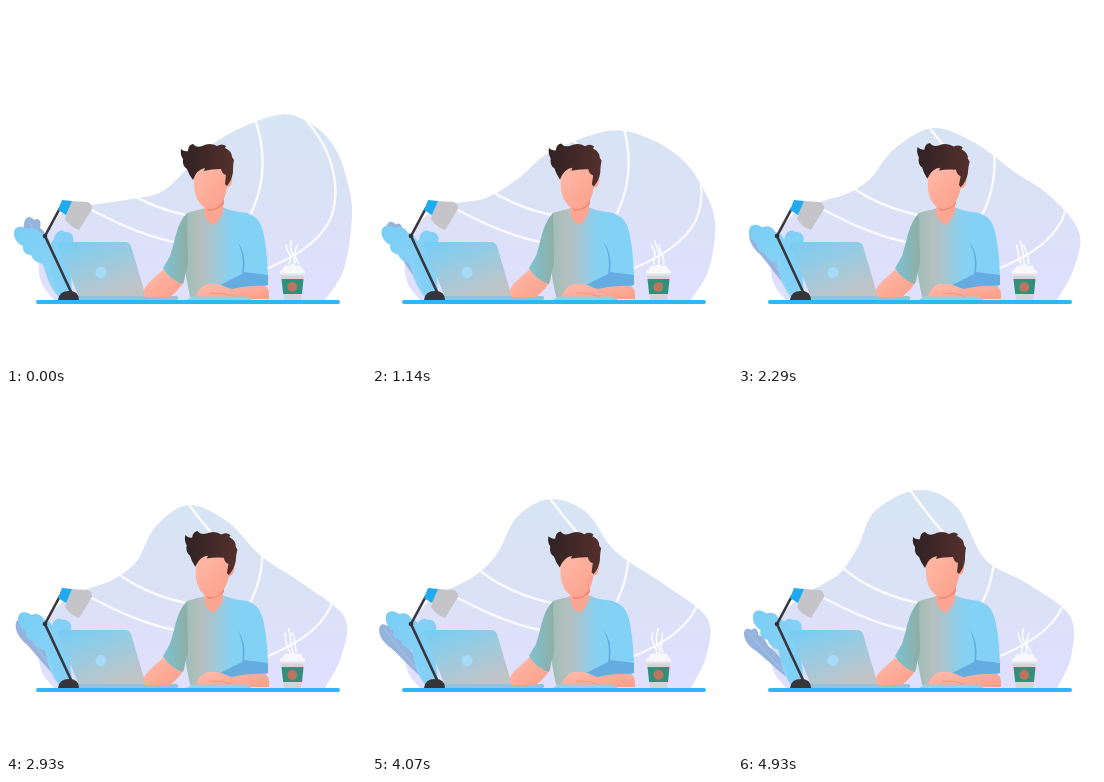
Recreate the animation shown at these times as an HTML page. Size 360 px wide and 360 px high, loop 5000 ms.

```html
<!DOCTYPE html>
<html lang="en">
<head>
<meta charset="utf-8">
<title>Working at a desk</title>
<style>
html, body { margin: 0; width: 100%; height: 100%; overflow: hidden; background: #fff; }
svg { display: block; width: 100vw; height: 100vh; }
</style>
</head>
<body>
<svg viewBox="0 0 360 360">
  <defs>
    <linearGradient id="sky" x1="0" y1="100" x2="0" y2="294" gradientUnits="userSpaceOnUse">
      <stop offset="0" stop-color="#d7e5f3"/><stop offset=".45" stop-color="#dae2f5"/><stop offset="1" stop-color="#e0dfff"/>
    </linearGradient>
    <linearGradient id="screen" x1="0" y1="0" x2=".6" y2="1">
      <stop offset="0" stop-color="#74cdf5"/><stop offset=".5" stop-color="#9bcbe0"/><stop offset="1" stop-color="#c0c4c7"/>
    </linearGradient>
    <linearGradient id="shirt" x1="164" y1="0" x2="263" y2="0" gradientUnits="userSpaceOnUse">
      <stop offset="0" stop-color="#7fbcae"/><stop offset=".3" stop-color="#b5bfbd"/>
      <stop offset=".42" stop-color="#a9c5cd"/><stop offset=".62" stop-color="#85d1f3"/><stop offset="1" stop-color="#80d2f7"/>
    </linearGradient>
    <linearGradient id="sleeve" x1="0" y1="0" x2="1" y2="0">
      <stop offset="0" stop-color="#7cc3d2"/><stop offset="1" stop-color="#8eaea4"/>
    </linearGradient>
    <linearGradient id="skin" x1="0" y1="0" x2="1" y2="1">
      <stop offset="0" stop-color="#ffbcab"/><stop offset="1" stop-color="#fb9d88"/>
    </linearGradient>
    <linearGradient id="hair" x1="0" y1="0" x2="1" y2="0">
      <stop offset="0" stop-color="#2f2224"/><stop offset="1" stop-color="#55302c"/>
    </linearGradient>
    <linearGradient id="leaf" x1="0" y1="0" x2="1" y2="1">
      <stop offset="0" stop-color="#78cdf5"/><stop offset="1" stop-color="#93d5f7"/>
    </linearGradient>
    <clipPath id="clip"><path id="edge"/></clipPath>
  </defs>

  <path id="blob" fill="url(#sky)"/>
  <g clip-path="url(#clip)" fill="none" stroke="#fff" stroke-width="2.4" stroke-opacity=".85">
    <path d="M246 104C260 140 261 178 242 213"/>
    <path d="M298 112C326 142 337 182 324 214C312 238 286 252 260 263"/>
    <path d="M94 163C112 184 142 201 180 209"/>
    <path d="M78 200C105 214 134 229 168 236"/>
    <path d="M169 92Q186 116 207 141"/>
  </g>

  <g id="grayLeaf">
    <path d="M55 288C42 270 34 252 26 240C18 230 16 221 19 214C22 209 26 211 28 214C33 211 36 216 34 222C41 226 39 233 42 240C50 252 56 270 57 288Z" fill="#94b3dd"/>
    <path d="M24 216Q34 242 54 284" fill="none" stroke="#b7caea" stroke-width=".7"/>
  </g>
  <g id="blueLeaf">
    <path d="M56 294C46 286 41 273 37 258C31 257 27 254 25 249C19 249 16 244 17 240C10 237 6 229 9 223C13 219 18 221 21 223C27 220 32 223 34 227C41 228 44 234 45 240C54 252 63 276 66 294Z" fill="url(#leaf)"/>
  </g>
  <path id="backLeaf" d="M44 262C41 249 43 238 48 233C49 226 55 222 59 226C65 225 69 231 67 236C72 243 68 252 64 256L66 286L52 288Z" fill="#83d0f6"/>

  <path d="M56 236H119Q123 236 125 240L140 291H73L52 240Q51 236 56 236Z" fill="url(#screen)"/>
  <circle cx="95" cy="266.500" r="5.500" fill="#a6dbf8"/>
  <rect x="70" y="290" width="102" height="4" rx="1.500" fill="#92c2df"/>

  <g fill="none" stroke="#37373d" stroke-width="2.600" stroke-linecap="round">
    <path d="M66 288L39 230L54 202"/>
  </g>
  <circle cx="39" cy="230" r="2.300" fill="#30303a"/>
  <path d="M52 294Q53 285 63 285Q73 285 73 294Z" fill="#35353a"/>
  <path d="M65 195L82 196Q87 199 86 203L73 224Q64 221 59 213Z" fill="#c5c4c8"/>
  <path d="M56 194L66 195L60 209L52 204Z" fill="#20aaf0"/>

  <path d="M159 262C150 270 143 276 140 280C136 286 138 291 142 291H164C171 285 176 280 179 273Z" fill="url(#skin)"/>
  <path d="M181 207C191 204 197 203 202 201H216C225 205 234 206 241 207C252 211 256 218 258 230C261 246 262 261 262 278L250 291H184L180 270Z" fill="url(#shirt)"/>
  <path d="M181 207C170 218 169 236 164 250L157 262Q164 274 177 278L182 258Z" fill="url(#sleeve)"/>
  <path d="M231 235C237 246 238 257 236 268L214 279L223 284L262 279V269L238 266Q241 248 231 235Z" fill="#65ace1"/>
  <path d="M190 289C193 283 197 279 202 278H211C217 279 221 282 226 283Q245 279 258 280Q264 281 263 293H195Z" fill="url(#skin)"/>
  <path d="M204 287Q217 286 228 291" fill="none" stroke="#f0907d" stroke-width=".8"/>
  <path d="M199 194H217V206Q212 217 207 219Q200 216 198 206Z" fill="#fba592"/>
  <path d="M200 201Q211 201 218 192V198Q212 205 202 205Z" fill="#ee8c79"/>

  <g id="head">
    <path d="M187 160Q203 152 222 160V170Q227 169 226 175Q225 181 221 181C220 191 215 203 205 203C195 203 189 192 188 181Z" fill="url(#skin)"/>
    <path d="M175 143Q178 146 182 145Q182 139 187 138Q190 142 196 140Q204 136 211 140Q216 137 220 140L219 142Q226 145 226 151L228 154Q227 158 227 166Q226 174 221 180L219 178L220 169Q216 168 215 163Q205 163 198 165L199 162Q191 163 187 174Q183 169 181 163Q176 160 177 153Q174 149 175 143Z" fill="url(#hair)"/>
  </g>

  <path d="M181 294L186 290.500H240L246 294Z" fill="#9ccbe7"/>

  <g id="steam" fill="none" stroke="#fff" stroke-width="1.500" stroke-linecap="round">
    <path/><path/><path/>
  </g>
  <path d="M275 268H298L295 294H278Z" fill="#d6d3d5"/>
  <path d="M275.500 273H297.500L296 288H277.200Z" fill="#2f917b"/>
  <circle cx="286.300" cy="281" r="5" fill="#b9755f"/>
  <path d="M274 269V265L277 263Q278 258 283 260Q287 256 290 260Q296 258 296 263L299 265V269Z" fill="#f8f7fb"/>
  <path d="M274 267.500H299V269.500H274Z" fill="#e5e3ec"/>

  <rect x="30" y="294" width="304" height="4" rx="2" fill="#30b5f6"/>
</svg>
<script>
const LOOP = 5000, STEPS = 70;
const $ = id => document.getElementById(id);
const lerp = (a, b, k) => a + (b - a) * k;
const fix = n => n.toFixed(2);

// Upper contour of the backdrop, left to right, at a few moments.
const poses = [
  [0,    125,193, 160,183, 208,137, 271,109, 307,119, 330,144, 342,178, 346,210],
  [790,  117,193, 150,174, 185,146, 250,122, 288,129, 317,149, 335,182, 344,218],
  [1570, 112,190, 140,172, 172,145, 222,128, 262,136, 300,157, 327,184, 342,216],
  [2290, 108,188, 132,173, 156,143, 195,122, 237,137, 275,165, 312,190, 341,226],
  [2930, 106,186, 130,168, 150,132, 183,111, 222,128, 255,162, 300,192, 339,224],
  [4070, 104,181, 125,160, 145,123, 178,105, 214,118, 243,157, 290,189, 335,224],
  [4930, 103,178, 120,153, 137,117, 180,96, 218,112, 247,165, 290,190, 332,222]
];

function contour(t) {
  let i = 0;
  while (i < poses.length - 2 && t >= poses[i + 1][0]) i++;
  const a = poses[i], b = poses[i + 1];
  const k = (t - a[0]) / (b[0] - a[0]);
  const pts = [[48, 294], [36, 278], [33, 256], [42, 225], [62, 203], [85, lerp(199, 190, t / LOOP)]];
  for (let j = 1; j < a.length; j += 2) pts.push([lerp(a[j], b[j], k), lerp(a[j + 1], b[j + 1], k)]);
  pts.push([lerp(338, 333, t / LOOP), 263], [319, 294]);
  return pts;
}

function smooth(pts) {
  const at = i => pts[Math.max(0, Math.min(pts.length - 1, i))];
  let d = "M" + pts[0].map(fix);
  for (let i = 0; i < pts.length - 1; i++) {
    const [p, q, r, s] = [at(i - 1), at(i), at(i + 1), at(i + 2)];
    const c1 = q.map((v, n) => fix(v + (r[n] - p[n]) / 6));
    const c2 = r.map((v, n) => fix(v - (s[n] - q[n]) / 6));
    d += `C${c1} ${c2} ${r.map(fix)}`;
  }
  return d;
}

const wisps = [...$("steam").children];

function draw(t) {
  const u = t / LOOP;
  const sway = (1 - Math.cos(2 * Math.PI * u)) / 2;

  const d = smooth(contour(t)) + "Z";
  $("blob").setAttribute("d", d);
  $("edge").setAttribute("d", d);

  $("head").setAttribute("transform", `rotate(${fix(4.2 * sway)} 205 206)`);

  const size = lerp(1, .85, u);
  $("grayLeaf").setAttribute("transform",
    `translate(56 288) rotate(${fix(-19 * u)}) scale(${fix(size)}) translate(-56 -288)`);
  $("blueLeaf").setAttribute("transform", `rotate(${fix(6 * u)} 58 292)`);
  $("backLeaf").setAttribute("transform", `rotate(${fix(-4 * u)} 58 288)`);

  const wave = lerp(1.8, .5, sway);
  wisps.forEach((w, k) => {
    const pts = [];
    for (let j = 0; j <= 6; j++) {
      const h = j / 6;
      const x = 283 + 4 * k - lerp(1, 5, sway) * h + wave * Math.sin(5 * h + k - 2 * Math.PI * u);
      pts.push([x, 258 - (k === 1 ? 23 : 19) * h]);
    }
    w.setAttribute("d", smooth(pts));
  });
}

function tick(now) {
  const step = Math.floor((now % LOOP) / LOOP * STEPS + .05) % STEPS;
  draw(step * LOOP / STEPS);
  requestAnimationFrame(tick);
}
draw(0);
requestAnimationFrame(tick);
</script>
</body>
</html>
```
